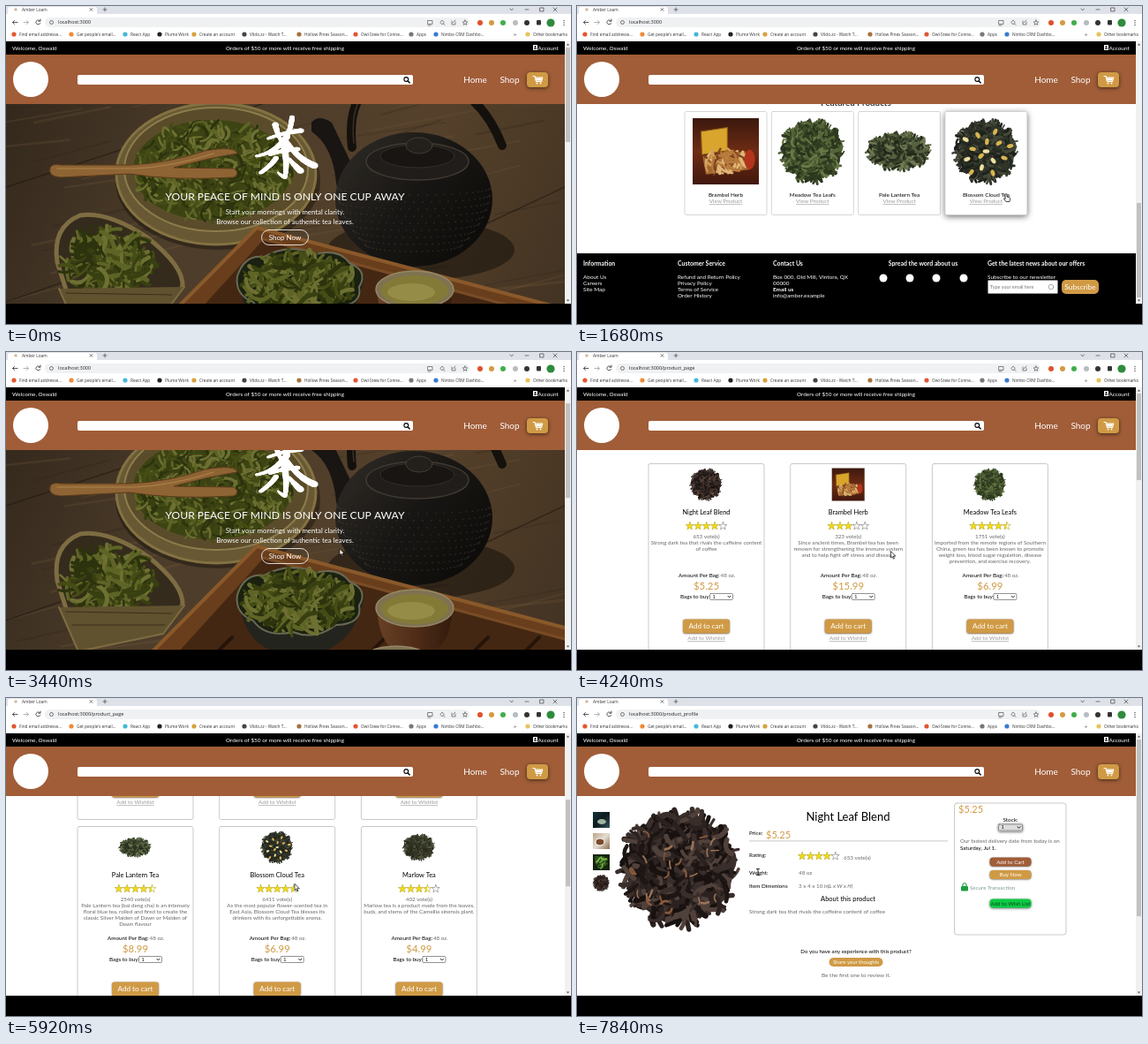
Animation of 640x360 px, one loop 8 s. Source, as an HTML page with a canvas:

```html
<!DOCTYPE html>
<html lang="en">
<head>
<meta charset="utf-8">
<title>Amber Loam</title>
<style>
html, body { margin: 0; width: 100%; height: 100%; overflow: hidden; background: #000; }
canvas { display: block; width: 640px; height: 360px; }
</style>
</head>
<body>
<canvas id="stage" width="640" height="360"></canvas>
<script>
const LOOP = 8000, STEP = 80, TAU = Math.PI * 2;
const GOLD = '#d09a45', BROWN = '#a05d38', GREY = '#666', PALE = '#999';
const screen = document.getElementById('stage').getContext('2d');
let c = screen, seed = 1;

// ---- drawing helpers ----
const random = () => (seed = seed * 16807 % 2147483647) / 2147483647;

function text(s, x, y, size, color = '#000', align = 'left', style = '', family = 'Lato, sans-serif') {
  c.font = `${style} ${size}px ${family}`;
  c.textAlign = align;
  c.fillStyle = color;
  c.fillText(s, x, y + size * 0.35);
}
const ui = (s, x, y, size = 4.75, color = '#333') => text(s, x, y, size, color, 'left', '', '"Open Sans", sans-serif');
const lines = (list, x, y, size, color, align) => list.forEach((s, i) => text(s, x, y + i * 7, size, color, align));
function link(s, x, y, size = 6.3) {
  text(s, x, y, size, PALE, 'center');
  const w = c.measureText(s).width;
  rect(x - w / 2, y + 3, w, 0.6, PALE);
}
function rect(x, y, w, h, color) { c.fillStyle = color; c.fillRect(x, y, w, h); }
function box(x, y, w, h, r, fill, line, shadow = 0) {
  c.save();
  c.beginPath();
  c.roundRect(x, y, w, h, r);
  if (shadow) { c.shadowColor = '#0009'; c.shadowBlur = shadow; c.shadowOffsetY = shadow / 4; }
  if (fill) { c.fillStyle = fill; c.fill(); }
  c.shadowColor = 'transparent';
  if (line) { c.strokeStyle = line; c.lineWidth = 0.8; c.stroke(); }
  c.restore();
}
function oval(x, y, rx, ry, fill, line, width = 1, turn = 0) {
  c.beginPath();
  c.ellipse(x, y, rx, ry, turn, 0, TAU);
  if (fill) { c.fillStyle = fill; c.fill(); }
  if (line) { c.strokeStyle = line; c.lineWidth = width; c.stroke(); }
}
const dot = (x, y, r, color) => oval(x, y, r, r, color);
function path(d, fill, line, width = 1, x = 0, y = 0) {
  c.save();
  c.translate(x, y);
  const p = new Path2D(d);
  if (fill) { c.fillStyle = fill; c.fill(p); }
  if (line) { c.strokeStyle = line; c.lineWidth = width; c.lineCap = c.lineJoin = 'round'; c.stroke(p); }
  c.restore();
}
function gradient(x1, y1, x2, y2, ...colors) {
  const g = c.createLinearGradient(x1, y1, x2, y2);
  colors.forEach((color, i) => g.addColorStop(i / (colors.length - 1), color));
  return g;
}
function pill(s, x, y, w, h, size, fill, r = h / 2, color = '#fff', shadow = 2) {
  box(x - w / 2, y - h / 2, w, h, r, fill, null, shadow);
  text(s, x, y, size, color, 'center');
}

// ---- tea and photographs ----
function leaves(x, y, rx, ry, count, length, width, colors) {
  c.lineCap = 'round';
  for (let i = 0; i < count; i++) {
    const a = random() * TAU, r = Math.sqrt(random()), turn = random() * TAU, bend = random() * 2 - 1;
    const px = x + Math.cos(a) * r * rx, py = y + Math.sin(a) * r * ry;
    const dx = Math.cos(turn) * length / 2, dy = Math.sin(turn) * length / 2;
    c.strokeStyle = colors[Math.floor(random() * colors.length)];
    c.lineWidth = width * (0.6 + random() * 0.7);
    c.beginPath();
    c.moveTo(px - dx, py - dy);
    c.quadraticCurveTo(px + dy * bend, py - dx * bend, px + dx, py + dy);
    c.stroke();
  }
}
const TEAS = {
  night: { colors: ['#17110f', '#2b2220', '#3a2e2b', '#51413b', '#1d1614'], flat: 1 },
  meadow: { colors: ['#27331c', '#3c4a29', '#556438', '#2f3b20', '#6a7846'], flat: 1 },
  lantern: { colors: ['#22291b', '#39432b', '#55603f', '#6f7852', '#2b3020'], flat: 0.55 },
  blossom: { colors: ['#1d201a', '#30352a', '#434838', '#262a22'], flat: 1, petals: true },
  marlow: { colors: ['#26281c', '#3a3c2a', '#575942', '#2f3022'], flat: 0.8 }
};
function product(kind, x, y, r) {
  if (kind === 'root') {
    rect(x - r, y - r, 2 * r, 2 * r, gradient(x, y - r, x, y + r, '#3a180e', '#6e2c14', '#40170d'));
    path(`M${-r * .75} ${-r * .6}L${r * .05} ${-r * .72}V${-r * .02}L${-r * .72} ${r * .1}Z`, '#d9a52c', '#8b5a16', r * .03, x, y);
    path(`M${-r * .7} ${r * .15}L${r * .6} 0L${r * .7} ${r * .55}L${-r * .6} ${r * .7}Z`, '#a3672f', null, 1, x, y);
    seed = 5;
    leaves(x, y + r * .3, r * .6, r * .25, 50, r * .45, r * .07, ['#d3a05a', '#b87a3c', '#e0b877', '#7d4420']);
    oval(x + r * .72, y + r * .25, r * .16, r * .3, '#b3341c');
    return;
  }
  const { colors, flat, petals } = TEAS[kind];
  seed = 77;
  oval(x, y, r * .86, r * .86 * flat, colors[1]);
  leaves(x, y, r * .9, r * .9 * flat, 420, r * .24, r * .07, colors);
  if (kind === 'night') leaves(x, y, r * .8, r * .8, 26, r * .12, r * .03, ['#8a5a3c', '#9a7358']);
  if (petals) for (let i = 0; i < 15; i++) {
    const a = i * 2.4, d = r * .8 * Math.sqrt(i / 15);
    oval(x + Math.cos(a) * d, y + Math.sin(a) * d, r * .1, r * .06, i % 3 ? '#d9b552' : '#efe0a0', null, 1, a);
  }
}
function brush(x1, y1, cx, cy, x2, y2, w1, w2) {
  for (let u = 0; u <= 1; u += 0.02) {
    const v = 1 - u, w = w1 + (w2 - w1) * u;
    oval(v * v * x1 + 2 * u * v * cx + u * u * x2, v * v * y1 + 2 * u * v * cy + u * u * y2, w, w * .75, '#fff');
  }
}
function hero() {
  const green = ['#31390f', '#4d5518', '#69702a', '#3f4713', '#7a7e38'];
  c.save();
  c.beginPath(); c.rect(0, 111, 633, 295); c.clip();
  rect(0, 111, 633, 295, gradient(0, 111, 633, 380, '#3a2d20', '#56442f', '#5f4930', '#4a3826'));
  seed = 9;
  for (let i = 0; i < 70; i++) {
    const x = random() * 633 - 60, y = 111 + random() * 295;
    path(`M${x} ${y}l${60 + random() * 90} ${-12 - random() * 14}`, null, i % 2 ? '#2b201433' : '#8a6d4833', 1 + random() * 2);
  }
  path('M0 205L290 111M0 335L130 290M430 300L633 205', null, '#21180f88', 1.5);

  oval(240, 198, 116, 78, '#0005');
  oval(238, 190, 113, 80, '#75643a', '#94804a', 3);
  oval(238, 185, 104, 70, '#65552f', '#a08d57', 2);
  oval(234, 186, 90, 57, '#454c16');
  leaves(234, 186, 87, 54, 420, 14, 3, green);
  path('M50 183Q52 178 62 180L140 180Q185 178 225 164Q260 158 262 167Q230 172 190 183L258 184Q266 189 258 194Q190 198 140 190L62 194Q47 193 50 183Z', '#a0703a', '#65421f');
  path('M58 184L145 184Q190 182 235 167', null, '#c39455', 1.2);

  oval(470, 276, 106, 34, '#0006');
  path('M392 160Q384 90 440 76Q530 75 562 158', null, '#17130f', 10);
  path('M394 155Q387 90 440 78', null, '#40362a', 1.5);
  path('M346 132Q354 122 369 132L390 176L418 190L405 250Q380 238 374 200Q370 158 346 142Z', '#1b1815');
  oval(462, 219, 89, 76, gradient(380, 150, 540, 280, '#34302b', '#1b1916', '#0e0c0a'));
  for (let row = 0; row < 9; row++) for (let i = 0; i < 27; i++) {
    const a = Math.PI * (i + row % 2 / 2) / 27;
    dot(462 - Math.cos(a) * (87 - row * row * .5), 206 + row * 8 + Math.sin(a) * 8, .9, '#4a443a88');
  }
  oval(466, 176, 58, 21, '#25211d', '#48413a', 1.5);
  oval(466, 170, 42, 13, '#1b1815', '#39332c', 1);
  oval(468, 158, 15, 9, '#27231e', '#4c443b');

  path('M58 290Q52 250 84 237Q115 232 160 262Q202 295 200 318L170 342L78 352Z', '#3a3020', '#8d794a', 5);
  leaves(115, 292, 46, 38, 170, 24, 4, green);
  path('M60 320L82 370L178 350L202 318', '#6d5c35', '#8d794a', 2);
  path('M68 325L188 327M75 340L180 340', null, '#40341d', 1);

  path('M284 251L640 345V410H160L166 370Z', '#76461f', '#9b642f', 4);
  path('M292 264L633 356V406H195L185 382Z', '#4c2c14');
  for (let i = 0; i < 7; i++) path(`M${212 + i * 58} 398l44 -44`, null, '#2a170a', 4);
  path('M186 376L640 402M292 264L633 356', null, '#87552a', 3);

  path('M262 304Q268 358 300 368H365Q400 350 406 305Z', '#272820');
  path('M262 306Q270 281 292 284Q320 268 350 281Q377 274 389 291Q411 300 400 318Q404 339 374 340Q350 358 325 348Q294 355 280 335Q259 327 262 306Z', '#1d2512', '#77775f', 2);
  leaves(332, 314, 58, 30, 280, 20, 4, green);
  for (const [x, y] of [[463, 321], [442, 385]]) {
    path(`M-43 0Q-40 40 -22 47H22Q40 40 43 0Z`, gradient(-40, 0, 40, 0, '#73482a', '#5a321b', '#3b1f10'), null, 1, x, y);
    oval(x, y, 44, 21, '#8d805c', '#a79970', 1.5);
    oval(x, y + 1, 38, 17, '#94893f');
    oval(x - 4, y + 3, 27, 10, '#a79d50');
  }
  rect(0, 111, 633, 295, '#0000001c');

  brush(297, 150, 315, 143, 335, 141, 2, 3.5);
  brush(305, 134, 307, 144, 312, 153, 3.5, 2);
  brush(324, 126, 323, 138, 317, 150, 3, 2.5);
  brush(318, 148, 306, 166, 283, 170, 4, 2);
  brush(316, 150, 328, 172, 350, 181, 2.5, 4.5);
  brush(299, 168, 314, 163, 331, 162, 2.5, 3.2);
  brush(315, 158, 319, 178, 316, 194, 4, 2.5);
  brush(316, 194, 311, 192, 308, 188, 2.5, 1);
  brush(306, 172, 300, 181, 288, 189, 3, 2.5);
  brush(321, 173, 326, 180, 334, 187, 2, 4);
  text('YOUR PEACE OF MIND IS ONLY ONE CUP AWAY', 316, 216, 12.1, '#fff', 'center');
  text('Start your mornings with mental clarity.', 316, 233, 7.8, '#fff', 'center');
  text('Browse our collection of authentic tea leaves.', 316, 244, 7.8, '#fff', 'center');
  box(289.5, 253.5, 53, 17, 8.5, null, '#fff');
  text('Shop Now', 316, 262, 8, '#fff', 'center');
  c.restore();
}

// ---- pages, laid out at scroll position zero ----
function benefits() {
  const y = 502, names = ['Aromatic', 'Great Taste', '100% Organic', '100% Satisfaction Guaranteed'];
  const notes = ['Experience fragrant smells', 'Will lighten up your taste buds', 'Sustainable agriculture practice', 'Or your money back'];
  const steam = 'M-6 -6q-3 -3 0 -5t0 -4M0 -6q-3 -3 0 -5t0 -4M6 -6q-3 -3 0 -5t0 -4';
  path(steam, null, '#000', 1.5, 182, y);
  path('M-10 -3H10L8 0Q15 5 12 12Q10 16 5 16H-5Q-10 16 -12 12Q-15 5 -8 0ZM-12 4H12M-4 8H4V12H-4Z', null, '#000', 1.6, 182, y);
  path('M-5 -7q-3 -2 0 -4M0 -7q-3 -2 0 -4M-11 -4H9V5Q8 11 3 11H-5Q-10 11 -11 5ZM9 -1H14Q15 6 8 6M-13 14H12M-4 0V6H2V0Z', null, '#000', 1.4, 272, y);
  path('M0 15Q-7 2 -3 -14Q5 0 2 15ZM-2 15Q-10 12 -13 1Q-4 5 -2 15ZM3 15Q4 2 13 -6Q13 8 3 15ZM-4 9Q-10 0 -10 -8Q-3 -2 -4 9ZM5 15Q9 7 16 7Q13 13 5 15Z', '#000', null, 1, 361, y);
  for (let i = 0; i < 8; i++) {
    const a = i * TAU / 8;
    oval(450 + Math.cos(a) * 10.5, y + Math.sin(a) * 10.5, 4.6, 4.6, '#fff', '#000', 1.1);
  }
  oval(450, y, 8, 8, '#fff', '#000', 1.1);
  path('M-4 2Q0 7 4 2M-3 -2v.5M3 -2v.5', null, '#000', 1.2, 450, y);
  [182, 272, 361, 450].forEach((x, i) => {
    text(names[i], x, 524, 6.3, '#000', 'center');
    text(notes[i], x, 531, 6.3, PALE, 'center');
  });
}
function footer(y) {
  const head = (s, x, align) => text(s, x, y + 12, 6.9, '#fff', align, 'bold');
  const list = (items, x) => lines(items, x, y + 27, 6.4, '#fff');
  rect(0, y, 633, 57, '#000');
  head('Information', 7);
  list(['About Us', 'Careers', 'Site Map'], 7);
  head('Customer Service', 114);
  list(['Refund and Return Policy', 'Privacy Policy', 'Terms of Service', 'Order History'], 114);
  head('Contact Us', 222);
  list(['Box 000, Old Mill, Vintora, QX', '00000', '', 'info@amber.example'], 222);
  text('Email us', 222, y + 41, 6.4, '#fff', 'left', 'bold');
  head('Spread the word about us', 392, 'center');
  [347, 377, 407, 438].forEach(x => dot(x, y + 28, 4.5, '#fff'));
  head('Get the latest news about our offers', 465);
  text('Subscribe to our newsletter', 465, y + 27, 6.4, '#fff');
  box(465.5, y + 30.5, 79, 15, 1, '#fff', '#888');
  text('Type your email here', 468, y + 38, 5.4, '#777');
  oval(537, y + 38, 2.8, 2.8, null, '#888', .7);
  pill('Subscribe', 570, y + 38, 42, 16, 8.3, GOLD, 5);
}
function home(hovered) {
  hero();
  text('Our meticulous standards go a long way', 316, 432, 12.1, '#000', 'center');
  lines(['All of our tea leaves are hand-picked in good shape, whole, and without any tear.',
    'We avoid the use of any industrial machines to pick the leaves in order to maintain',
    'excellent quality.'], 316, 447, 6.3, GREY, 'center');
  benefits();
  text('Featured Products', 316, 598, 9.9, '#000', 'center');
  [['root', 'Brambel Herb'], ['meadow', 'Meadow Tea Leafs'], ['lantern', 'Pale Lantern Tea'], ['blossom', 'Blossom Cloud Tea']]
    .forEach(([kind, name], i) => {
      const x = 168.5 + i * 98.3;
      box(x - 46.5, 607.5, 93, 117, 2, '#fff', '#ccc', hovered && i === 3 ? 7 : 0);
      product(kind, x, 652.5, 37.5);
      text(name, x, 702, 6.4, '#000', 'center');
      link('View Product', x, 709);
    });
  footer(768);
}

const CATALOGUE = [
  ['night', 'Night Leaf Blend', 4, 653, '5.25', ['Strong dark tea that rivals the caffeine content', 'of coffee']],
  ['root', 'Brambel Herb', 3, 323, '15.99', ['Since ancient times, Brambel tea has been', 'renown for strengthening the immune system', 'and to help fight off stress and disease.']],
  ['meadow', 'Meadow Tea Leafs', 4.5, 1751, '6.99', ['Imported from the remote regions of Southern', 'China, green tea has been known to promote', 'weight loss, blood sugar regulation, disease', 'prevention, and exercise recovery.']],
  ['lantern', 'Pale Lantern Tea', 4.5, 2540, '8.99', ['Pale Lantern tea (bai deng cha) is an intensely', 'floral blue tea, rolled and fired to create the', 'classic Silver Maiden of Dawn or Maiden of', 'Dawn flavour']],
  ['blossom', 'Blossom Cloud Tea', 4.5, 6411, '6.99', ['As the most popular flower-scented tea in', 'East Asia, Blossom Cloud Tea blesses its', 'drinkers with its unforgettable aroma.']],
  ['marlow', 'Marlow Tea', 3.5, 402, '4.99', ['Marlow tea is a product made from the leaves,', 'buds, and stems of the Camellia sinensis plant.']]
];
function stars(x, y, rating) {
  for (let i = 0; i < 5; i++) {
    const p = new Path2D(), sx = x + i * 9.4;
    for (let k = 0; k < 10; k++) {
      const r = k % 2 ? 2 : 4.8, a = k * TAU / 10 - TAU / 4;
      p.lineTo(sx + Math.cos(a) * r, y + Math.sin(a) * r);
    }
    p.closePath();
    c.save();
    c.clip(p);
    rect(sx - 5, y - 5, 10 * Math.min(1, Math.max(0, rating - i)), 10, '#f2dc12');
    c.restore();
    c.strokeStyle = rating > i ? '#b5a52a' : '#777';
    c.lineWidth = 0.6;
    c.stroke(p);
  }
}
function select(x, y, w, fill) {
  box(x, y - 3.5, w, 7, 1, fill, '#777');
  text('1', x + 3, y, 5.4);
  path('M-1.5 -.7L0 .8L1.5 -.7', null, '#000', .9, x + w - 4, y);
}
function shop(hovered) {
  for (let i = 0; i < 9; i++) {
    const [kind, name, rating, votes, price, about] = CATALOGUE[i % 6];
    const x = 146.5 + i % 3 * 160.7, y = 127 + Math.floor(i / 3) * 225;
    box(x - 65.5, y - .5, 131, 217, 2, '#fff', '#bbb', hovered && i === 0 ? 7 : 0);
    product(kind, x, y + 23, 18.5);
    text(name, x, y + 54, 7.4, '#000', 'center');
    stars(x - 18.8, y + 70, rating);
    text(`${votes} vote(s)`, x, y + 81.5, 6.2, GREY, 'center');
    lines(about, x, y + 88.5, 6.2, GREY, 'center');
    text('Amount Per Bag:', x - 31.5, y + 126, 6.3);
    text('48 oz.', x + 16, y + 126, 6.3, GREY);
    text('$' + price, x, y + 138, 11.4, GOLD, 'center');
    text('Bags to buy:', x - 29.5, y + 150, 6.3);
    select(x + 4, y + 150, 26, '#fff');
    pill('Add to cart', x, y + 183.5, 53, 16, 8.1, GOLD, 3);
    link('Add to Wishlist', x, y + 197);
  }
  footer(840);
}
function profile() {
  rect(18, 129, 19, 18, gradient(18, 129, 37, 147, '#16323c', '#0d1b1e', '#38525c'));
  oval(28, 140, 5, 3, '#9fb3a0');
  rect(18, 153, 19, 18, gradient(18, 153, 37, 171, '#b9a58a', '#e4ddd0', '#8d6d4c'));
  oval(26, 163, 5, 4, '#7a4b2c', '#fff');
  rect(18, 177, 19, 18, '#16240f');
  seed = 3;
  leaves(27.5, 186, 7, 6, 22, 6, 1.6, ['#4f8a2c', '#7bb347', '#2f5a1b']);
  product('night', 27.5, 209.5, 9.5);
  product('night', 116.5, 193, 70);

  text('Night Leaf Blend', 307, 134, 13, '#000', 'center');
  text('Price:', 195, 152.5, 6.3);
  text('$5.25', 214, 155.5, 11, GOLD);
  rect(195, 161.5, 225, .8, '#bbb');
  text('Rating:', 195, 177.5, 6.3);
  stars(255, 179, 4);
  text('653 vote(s)', 302, 181, 6.3, GREY);
  text('Weight:', 195, 198, 6.3);
  text('48 oz', 251, 198, 6.3, GREY);
  text('Item Dimenions', 195, 212.5, 6.3);
  text('3 x 4 x 10 in.', 251, 212.5, 6.3, GREY);
  text('(L x W x H)', 284, 212.5, 6.3, GREY, 'left', 'italic');
  text('About this product', 307, 227.5, 7.5, '#000', 'center');
  text('Strong dark tea that rivals the caffeine content of coffee', 195, 242, 6.3, GREY);
  text('Do you have any experience with this product?', 316, 287, 6.1, '#000', 'center');
  pill('Share your thoughts', 316, 299, 61, 10, 5.9, GOLD, 5, '#fff', 0);
  text('Be the first one to review it.', 316, 314, 6.4, GREY, 'center');

  box(427.5, 119, 126.5, 149, 3, null, '#bbb');
  text('$5.25', 432, 126, 11, GOLD);
  text('Stock:', 491, 138, 6.3, '#000', 'center');
  box(477, 142, 28, 9, 2, '#ddd', null, 3);
  select(477.5, 146.5, 27, '#ddd');
  text('Our fastest delivery date from today is on', 434, 162, 6.2, GREY);
  text('Saturday, Jul 1.', 434, 169.5, 6.2);
  pill('Add to Cart', 491, 185.5, 47, 10, 6.2, BROWN, 4);
  pill('Buy Now', 491, 200, 47, 10, 6.2, GOLD, 4);
  box(435, 213, 8, 5.5, 1, '#1b9e3e');
  path('M437 213V211Q439 208 441 211V213', null, '#1b9e3e', 1.2);
  text('Secure Transaction', 445, 214.5, 6.2, '#7d9a92');
  pill('Add to Wish List', 491, 232.5, 47, 10, 6.2, '#0bcb43', 4, '#12401f', 3);
}
function paint(page, hovered) {
  const canvas = document.createElement('canvas');
  canvas.width = 633;
  canvas.height = 900;
  c = canvas.getContext('2d');
  rect(0, 0, 633, 900, '#fff');
  page(hovered);
  c = screen;
  return canvas;
}

// ---- browser window and sticky header ----
function browser(address) {
  rect(0, 0, 640, 40, '#fff');
  rect(0, 0, 640, 9, '#dee2e8');
  box(2, 1, 101, 10, 3, '#fff');
  dot(11, 4, 1.8, '#d9b8a0');
  ui('Amber Loam', 18, 4);
  path('M95 2.5l3 3m0 -3l-3 3M110 4h4m-2 -2v4M571 3l1.7 2l1.7 -2M588 4h4M605 2h4v4h-4zM620 2l4 4m0 -4l-4 4', null, '#444', .7);
  path('M13 18.5H7.5m2 -2l-2 2l2 2', null, '#444', .9);
  path('M20 18.5h5.5m-2 -2l2 2l-2 2', null, '#aaa', .9);
  path('M38.5 17a2.5 2.5 0 1 0 .2 2.5M39 15v2.2h-2.2', null, '#444', .9);
  box(44, 13, 481, 11, 5.5, '#eff1f3');
  oval(51.5, 18.5, 2, 2, null, '#555', .8);
  ui(address, 59, 18.5, 5.5, '#222');
  path('M478 16.5h5v4h-5zM481 22h-3M494 16.5a2 2 0 1 0 .1 0M495.5 20l1.5 1.5M505 17v4h4v-3M506 19l3 -3M520 16l.8 1.8l2 .2l-1.5 1.3l.4 2l-1.7 -1l-1.7 1l.4 -2l-1.5 -1.3l2 -.2z', null, '#555', .7);
  [[537, '#e0502c'], [550, '#d59a3f'], [563, '#3fae49'], [577, '#b7bcc2'], [590, '#333']].forEach(([x, color]) => dot(x, 19, 3, color));
  box(601, 16, 5, 5.5, 1, '#333');
  dot(617, 19, 4.6, '#2e8b3d');
  [16.5, 19, 21.5].forEach(y => dot(632, y, .7, '#444'));
  [[15, 'Find email addresse...', '#e4572e'], [80, "Get people's email...", '#f08a35'], [141, 'React App', '#45b8d8'],
    [180, 'Plume Work', '#222'], [219, 'Create an account', '#d8a13c'], [276, 'Vildo.zz - Watch T...', '#444'],
    [338, 'Hollow Pines Season...', '#a8703c'], [402, 'Owl-Stew for Conne...', '#e05535'], [465, 'Apps', '#777'],
    [493, 'Nimbo CRM Dashbo...', '#3a7bd0'], [597, 'Other bookmarks', '#e8c35a']].forEach(([x, s, color]) => {
    dot(x - 6, 32, 2.6, color);
    ui(s, x, 32);
  });
  ui('»', 575, 32, 6);
}
function header() {
  rect(0, 40, 633, 15, '#000');
  text('Welcome, Oswald', 7, 47.5, 6.4, '#fff');
  text('Orders of $50 or more will receive free shipping', 316, 47.5, 6.4, '#fff', 'center');
  box(597, 44, 5, 6, .5, '#fff');
  dot(599.5, 46, 1, '#000');
  rect(598, 47.5, 3, 1.2, '#000');
  text('Account', 602.5, 47.5, 6.4, '#fff');
  rect(0, 55, 633, 56, BROWN);
  dot(28, 83, 20, '#fff');
  box(81, 78, 380, 11, 2, '#fff');
  oval(453.3, 83, 2.4, 2.4, null, '#000', 1.1);
  path('M455.2 85l2 2', null, '#000', 1.4);
  text('Home', 531.5, 83.5, 10, '#fff', 'center');
  text('Shop', 570.5, 83.5, 10, '#fff', 'center');
  box(590, 75, 24, 17, 4, GOLD, null, 4);
  path('M597 79.5h2l1.5 6h6l1.2 -4.5h-8', null, '#fff', 1.1);
  path('M600 81.5h7l-1 3h-5.3z', '#fff');
  dot(601.5, 87.5, .9, '#fff');
  dot(605.5, 87.5, .9, '#fff');
}
function scrollbar(scroll, height) {
  rect(633, 40, 7, 297, '#f1f1f1');
  path('M634.8 44.5l1.7 -2l1.7 2zM634.8 332.5l1.7 2l1.7 -2z', '#555');
  rect(634, 47 + scroll * 283 / height, 5, 297 * 283 / height, '#c1c1c1');
}
const POINTERS = {
  arrow: 'M0 0V7L1.7 5.5L2.9 8.2L4 7.7L2.8 5.1H5Z',
  hand: 'M-1 0Q0 -1 1 0V3L4 3.8Q5 4.2 4.6 6L4 8.5H0L-2.6 5Q-2.4 3.8 -1 5Z',
  beam: 'M-1.5 -3.5H1.5M0 -3.5V3.5M-1.5 3.5H1.5'
};
function pointer(kind, x, y) {
  if (kind === 'beam') path(POINTERS.beam, null, '#000', .8, x, y);
  else path(POINTERS[kind], '#fff', '#000', .7, x, y);
}

// ---- timeline ----
function track(keys, t) {
  let i = 0;
  while (i < keys.length - 2 && t > keys[i + 1][0]) i++;
  const [t0, ...a] = keys[i], [t1, ...b] = keys[i + 1];
  const u = Math.min(1, Math.max(0, (t - t0) / (t1 - t0)));
  return a.map((v, k) => v + (b[k] - v) * u);
}
const SCROLL_HOME = [[0, 0], [160, 0], [1280, 488], [1760, 488], [2240, 196], [2720, 31], [3920, 31]];
const SCROLL_SHOP = [[4400, 0], [5040, 211], [5520, 330], [5680, 330], [6320, 0]];
const CURSOR = [[0, 650, 190], [640, 489, 215], [1680, 486, 213], [2240, 482, 213], [2720, 440, 220], [3440, 378, 223],
  [3760, 326, 231], [4000, 326, 231], [4480, 385, 221], [5680, 385, 221], [6560, 172, 183], [6720, 169, 183], [7120, 169, 183], [7840, 205, 197]];
const pages = {
  home: [paint(home, false), paint(home, true)],
  shop: [paint(shop, false), paint(shop, true)],
  profile: [paint(profile, false)]
};

function draw(t) {
  const page = t < 3920 ? 'home' : t < 7120 ? 'shop' : 'profile';
  const scroll = page === 'home' ? track(SCROLL_HOME, t)[0] : page === 'shop' ? track(SCROLL_SHOP, t)[0] : 0;
  const hovered = page === 'home' ? t >= 1280 && t <= 1760 : page === 'shop' && t >= 6400;
  const [x, y] = track(CURSOR, t);
  rect(0, 0, 640, 360, '#000');
  c.save();
  c.beginPath(); c.rect(0, 40, 633, 297); c.clip();
  c.drawImage(pages[page][+hovered], 0, -Math.round(scroll));
  c.restore();
  header();
  scrollbar(scroll, { home: 785, shop: 857, profile: 420 }[page]);
  browser('localhost:3000' + { home: '', shop: '/product_page', profile: '/product_profile' }[page]);
  const onButton = page === 'home' && t >= 3600;
  pointer(t >= 6560 ? 'beam' : onButton || page === 'home' && hovered ? 'hand' : 'arrow', x, y);
}
function frame(now) {
  draw(Math.floor(now % LOOP / STEP) * STEP);
  requestAnimationFrame(frame);
}
requestAnimationFrame(frame);
</script>
</body>
</html>
```
